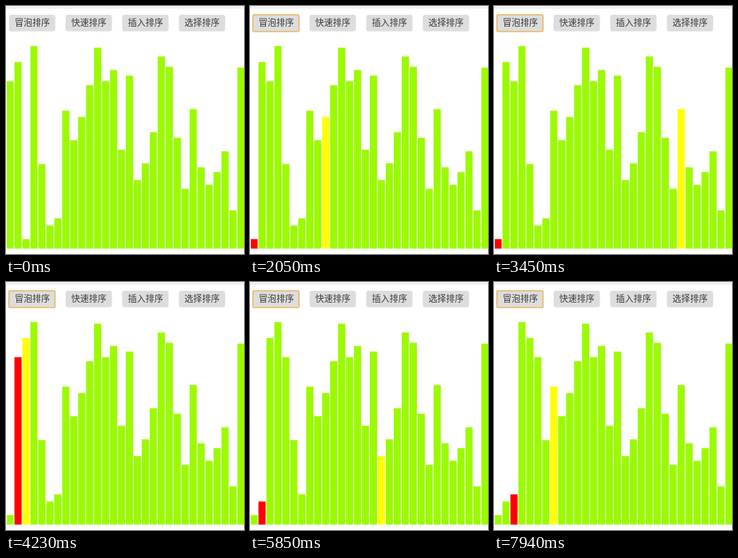
An HTML page for the animation above (8000 ms loop, 298x311 px).

```html
<!DOCTYPE html>
<html lang="zh-CN">
<head>
<meta charset="utf-8">
<title>排序演示</title>
<style>
  html, body { margin: 0; width: 100%; height: 100%; overflow: hidden; background: #fff; }
  svg { display: block; width: 298px; height: 311px; }
  text {
    font: 300 11px "Noto Sans CJK SC", "Noto Sans CJK", "Noto Sans CJK JP", sans-serif;
    fill: #3a3a3a; text-anchor: middle;
  }
</style>
</head>
<body>
<svg id="stage" viewBox="0 0 298 311"></svg>
<script>
const LOOP = 8000;
const CLICK = 1104;   // the first button is pressed
const FRAME = 77.6;   // the picture refreshes at this interval
const BASE = 304.3, LEFT = 0.6, PITCH = 9.968, BAR_WIDTH = 8.95;
const GREEN = '#9cfa00', RED = '#ff0000', YELLOW = '#ffff00';
const LABELS = ['冒泡排序', '快速排序', '插入排序', '选择排序'];

// The values to sort
const VALUES = [210, 234, 12, 254, 106, 29, 38, 173, 136, 165, 205, 252, 210, 224, 124,
  217, 86, 107, 146, 241, 228, 139, 75, 175, 102, 80, 96, 122, 48, 227];

// Pointer key points: frames after the click, x, y
const PATH = [
  [-9, 9, 4], [-7, 33.5, 16.5], [-6, 33.5, 16.5], [-3, 24.5, 23.5],
  [0, 24.5, 23.5], [3, 46.5, 53.5], [5, 226.5, 295]
];

const stage = document.getElementById('stage');

function set(node, attrs) {
  for (const key in attrs) node.setAttribute(key, attrs[key]);
}

function add(tag, attrs) {
  const node = document.createElementNS('http://www.w3.org/2000/svg', tag);
  set(node, attrs);
  return stage.appendChild(node);
}

// Each comparison is one step; a swap adds another
function* sortSteps(start) {
  const values = [...start];
  yield { values: start, i: -1, j: -1 };
  for (let i = 0; i < values.length - 1; i++) {
    for (let j = i + 1; j < values.length; j++) {
      yield { values: [...values], i, j };
      if (values[j] < values[i]) {
        [values[i], values[j]] = [values[j], values[i]];
        yield { values: [...values], i, j };
      }
    }
  }
}

// The sort ticks slower than the picture, so some frames bring no new step
function stepAt(frame) {
  const repeats = Math.max(0, Math.ceil((frame - 6.15) / 4.35));
  return Math.max(0, frame - repeats);
}

function pointerAt(frame) {
  const next = PATH.findIndex(key => key[0] >= frame);
  if (next < 0 || frame < PATH[0][0]) return null;
  const [f1, x1, y1] = PATH[next];
  const [f0, x0, y0] = PATH[Math.max(0, next - 1)];
  const p = f1 === f0 ? 1 : (frame - f0) / (f1 - f0);
  return { cx: x0 + (x1 - x0) * p, cy: y0 + (y1 - y0) * p };
}

const steps = [...sortSteps(VALUES)];

const bars = VALUES.map((_, n) => add('rect', { x: LEFT + n * PITCH, width: BAR_WIDTH }));
add('rect', { width: 1, height: 311, fill: '#fff' });
add('rect', { width: 298, height: 2, fill: '#f5f5f5' });
add('rect', { y: 2, width: 298, height: 1, fill: '#e4e4e4' });

LABELS.forEach((label, n) => {
  const x = 3.7 + n * 70.9;
  add('rect', { x, y: 11, width: 58, height: 20.7, rx: 3, fill: '#ddd' });
  add('text', { x: x + 29.2, y: 25.2 }).textContent = label;
});
const ring = add('rect', {
  x: 3.6, y: 11.1, width: 57.8, height: 21, rx: 1.5, fill: 'none', stroke: '#e8b964', 'stroke-width': 1.5
});
const pointer = add('circle', { r: 9.4, fill: '#8f8f8f' });

function show(node, visible) {
  node.style.display = visible ? '' : 'none';
}

function draw(now) {
  const frame = Math.floor((now % LOOP - CLICK) / FRAME);
  const { values, i, j } = steps[stepAt(frame)];
  bars.forEach((bar, n) => set(bar, {
    y: BASE - values[n],
    height: values[n],
    fill: n === i ? RED : n === j ? YELLOW : GREEN
  }));
  show(ring, frame >= 0);

  const spot = pointerAt(frame);
  show(pointer, spot);
  if (spot) set(pointer, spot);
}

const began = performance.now();
function tick() {
  draw(performance.now() - began);
  requestAnimationFrame(tick);
}
tick();
</script>
</body>
</html>
```
